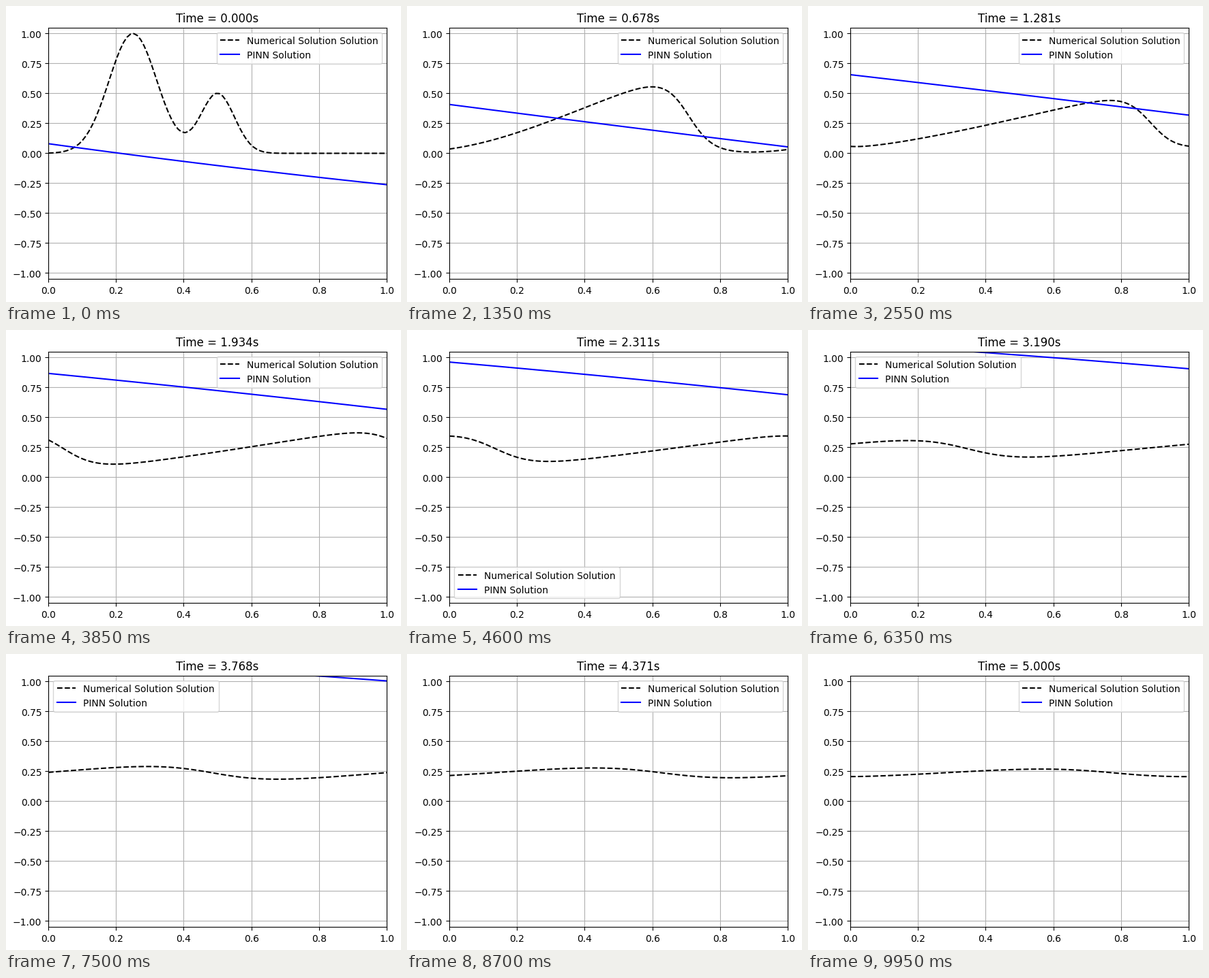
Recreate the animation shown at these times as a matplotlib script. Size 579 by 435 pixels, loop 10000 ms.

```python
import numpy as np
import matplotlib.pyplot as plt
from matplotlib.animation import FuncAnimation
from matplotlib.transforms import Affine2D

W, H, DPI = 579, 435, 100
FRAMES, INTERVAL = 200, 50
T_END, DT = 5.0, 0.001
NX, NU = 100, 0.01

x = np.linspace(0, 1, NX)
dx = x[1] - x[0]

# Solver steps shown, one per frame
shown = np.linspace(0, round(T_END / DT), FRAMES).astype(int)


def euler_step(u):
    """Viscous Burgers equation on a periodic grid, central differences."""
    right, left = np.roll(u, -1), np.roll(u, 1)
    u_x = (right - left) / (2 * dx)
    u_xx = (right - 2 * u + left) / dx**2
    return u + DT * (NU * u_xx - u * u_x)


def solve_numerical():
    u = np.exp(-100 * (x - 0.25)**2) + 0.5 * np.exp(-200 * (x - 0.5)**2)
    history = [u]
    for _ in range(shown[-1]):
        history.append(euler_step(history[-1]))
    return history


def pinn(t):
    """Nearly straight line whose ends rise along tanh curves."""
    left = -0.073 + 1.385 * np.tanh((t + 0.3) / 2.7)
    right = -0.1406 + 1.38 * np.tanh((t - 0.26) / 2.95)
    bow = -0.046 + 0.08 * np.tanh(t / 1.4)
    return left + (right - left) * x + bow * x * (1 - x)


numerical = solve_numerical()

# The tiny margin keeps the pixel size from being truncated
fig = plt.figure(figsize=((W + 1e-6) / DPI, (H + 1e-6) / DPI), dpi=DPI)
ax = fig.add_axes([62.08 / W, 33.72 / H, 496 / W, 369.6 / H])
ax.set_xlim(0, 1)
ax.set_ylim(-1.05, 1.05)
ax.grid(True)
num_line, = ax.plot(x, numerical[0], "k--", label="Numerical Solution Solution")
pinn_line, = ax.plot(x, pinn(0), "b-", label="PINN Solution")
title = ax.set_title("")
legend = ax.legend(loc="best")

# All text sits one pixel lower than the default layout
nudge = Affine2D().translate(0, -1)
for text in [title, *ax.get_xticklabels(), *ax.get_yticklabels(), *legend.get_texts()]:
    text.set_transform(text.get_transform() + nudge)


def update(i):
    t = shown[i] * DT
    num_line.set_ydata(numerical[shown[i]])
    pinn_line.set_ydata(pinn(t))
    title.set_text(f"Time = {t:.3f}s")
    return num_line, pinn_line, title


anim = FuncAnimation(fig, update, frames=FRAMES, interval=INTERVAL,
                     repeat=True, repeat_delay=0, blit=False)
plt.show()
```
